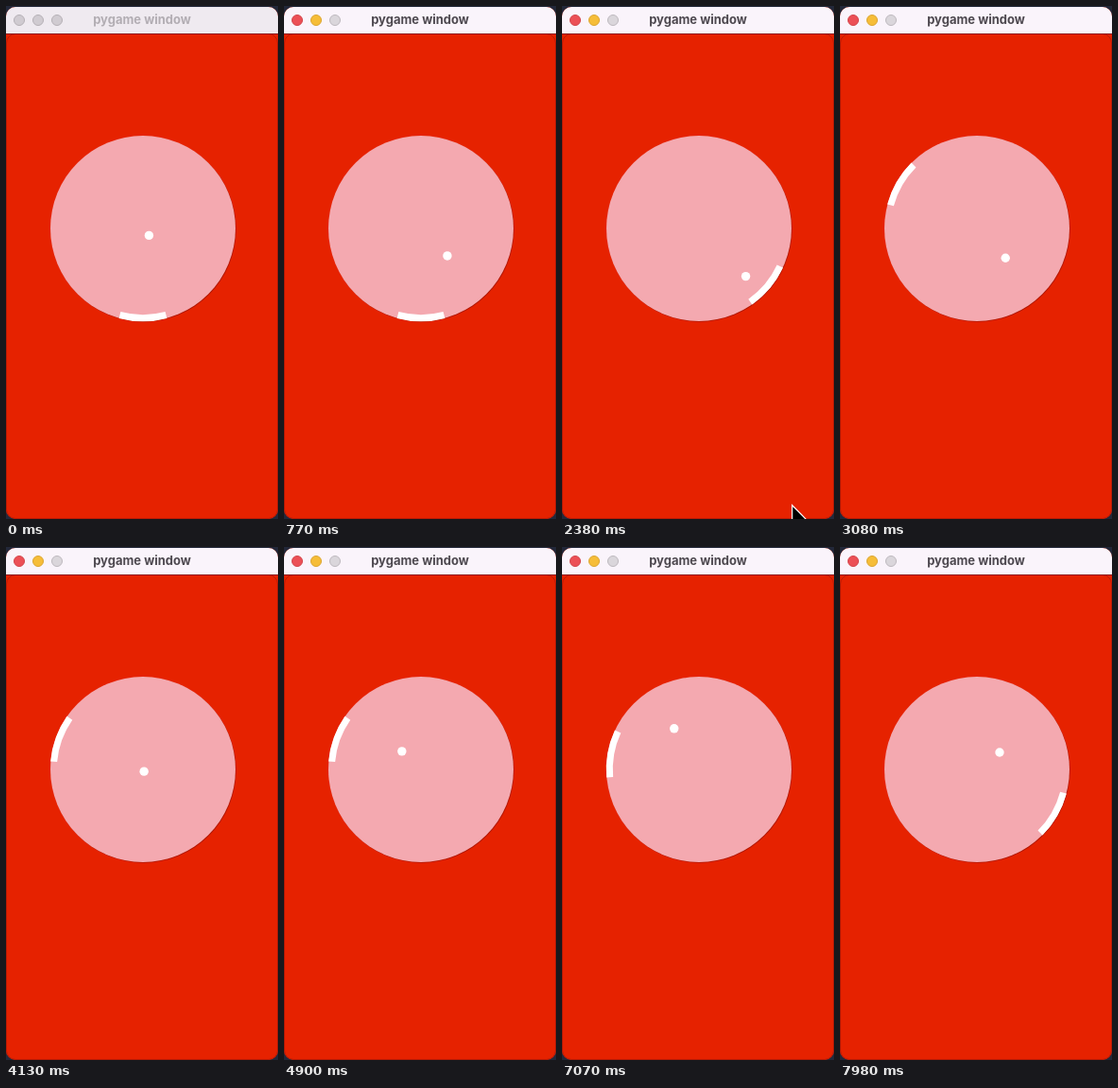
Recreate the animation shown at these times as an HTML page. Size 288 by 542 pixels, loop 8000 ms.

```html
<!DOCTYPE html>
<html lang="en">
<head>
<meta charset="utf-8">
<title>pygame window</title>
<style>
html, body { margin: 0; width: 288px; height: 542px; overflow: hidden; background: #23283a; }
svg { display: block; }
text { font: 700 13px Inter, "Liberation Sans", sans-serif; text-anchor: middle; fill: #4d484f; }
#bar { fill: #faf4fb; }
#lights { fill: #dad6db; stroke: #bdb8be; }
.active .close { fill: #ec5056; stroke: #d2454b; }
.active .min { fill: #f6bd38; stroke: #dba531; }
.idle #bar { fill: #efeaf0; }
.idle text { fill: #b2adb3; }
.idle #lights { fill: #d0cbd1; stroke: #b5b0b6; }
</style>
</head>
<body>
<svg id="stage" class="idle" width="288" height="542" viewBox="0 0 288 542">
  <defs><clipPath id="frame"><rect y="1" width="288" height="541" rx="10"/></clipPath></defs>
  <g clip-path="url(#frame)">
    <rect width="288" height="542" fill="#e62200"/>
    <rect x=".5" y="29.5" width="287" height="512" rx="9.5" fill="none" stroke="#b91b05"/>
    <rect id="bar" width="288" height="29"/>
    <rect y="29" width="288" height="1" fill="#8d1710"/>
    <g id="lights">
      <circle class="close" cx="14" cy="15" r="5.5"/>
      <circle class="min" cx="34" cy="15" r="5.5"/>
      <circle cx="54" cy="15" r="5.5"/>
    </g>
    <text x="144" y="19">pygame window</text>
    <circle cx="145.7" cy="235.7" r="98" fill="#b01600"/>
    <circle cx="145" cy="235" r="98" fill="#f4a9b0"/>
    <path id="paddle" d="M91.5-24.5A94.7 94.7 0 0 1 91.5 24.5" fill="none" stroke="#fff" stroke-width="7"/>
    <circle id="ball" r="4.7" fill="#fff"/>
  </g>
  <path id="cursor" d="M243.7 527.5V551L259 543Z" stroke="#fff" stroke-width="1.2"/>
</svg>
<script>
const STEP = 70, LOOP = 8000;
const [stage, paddle, ball, cursor] =
  ["stage", "paddle", "ball", "cursor"].map(id => document.getElementById(id));

// Keys are [step, value, ...]; times are counted in steps.
const ballPath = [[0, 151.4, 242.4], [28, 206.2, 297.2], [91.7, 82.8, 173.8], [114, 169, 217]];
const paddleTurn = [[0, 90], [15, 90], [17.5, 40], [34.5, 40], [44.5, -160], [71, -160],
  [72.5, -130], [99, -130], [109, -330], [115, -330]];

function at(keys, s) {
  const i = Math.max(1, keys.findIndex(k => k[0] >= s));
  const [a, b] = [keys[i - 1], keys[i]];
  const p = (s - a[0]) / (b[0] - a[0]);
  return a.slice(1).map((v, j) => v + (b[j + 1] - v) * p);
}

function draw(now) {
  let s = Math.floor(now % LOOP / STEP);
  if (s === 29) s = 28; // brief stall at the first bounce
  stage.setAttribute("class", s < 6 ? "idle" : "active");
  ball.setAttribute("transform", `translate(${at(ballPath, s)})`);
  paddle.setAttribute("transform", `translate(145 235) rotate(${at(paddleTurn, s)})`);
  cursor.style.display = s >= 15 && s < 35 ? "" : "none";
  requestAnimationFrame(draw);
}
draw(0);
</script>
</body>
</html>
```
